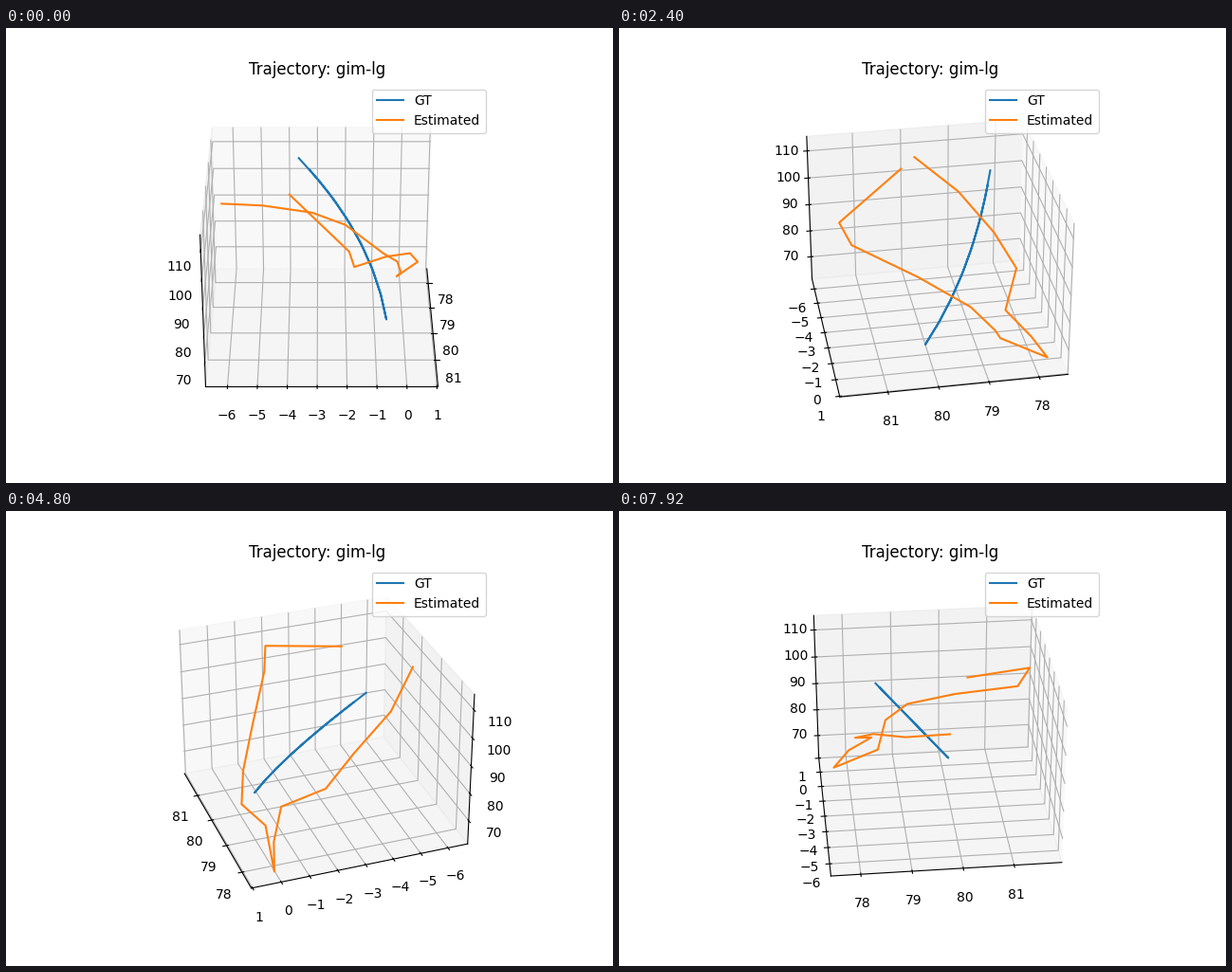
A matplotlib script that plays this animation: 640x480 px, repeating every 8 s.

```python
import numpy as np
import matplotlib.pyplot as plt
from matplotlib.animation import FuncAnimation

TICK = 40          # ms per drawn frame
HOLD = 3           # drawn frames per rotation step
STEP = 4           # degrees per rotation step
FRAMES = 200
Z_MID = 88.3


def arc(h):
    """Smooth curve through space, h above or below the middle height."""
    x = 79.243 - 0.03685 * h + 0.000213 * h**2
    y = -1.507 - 0.06416 * h - 0.000998 * h**2
    return x, y, Z_MID + h


# True path: down the arc in six steps, back up in seven
heights = np.concatenate([np.linspace(20.7, -20.8, 7),
                          np.linspace(-20.8, 24.2, 8)[1:]])
gt = arc(heights)

# Estimated path: even steps in height down and up again between these turns
turns = np.array([
    (79.76, -6.24), (78.98, -4.90), (78.43, -3.19), (78.11, -2.00),
    (78.49, -0.65), (78.03, -0.11), (77.71, 0.07), (78.64, -0.17),
    (78.84, 0.55), (79.29, 0.23), (80.23, -0.66), (81.43, -1.78),
    (81.65, -1.96), (80.25, -3.92),
])
level = 62.4 + 7.42 * np.abs(np.arange(len(turns)) - 6)
estimated = (*turns.T, level)

fig = plt.figure(figsize=(6.4, 4.8), dpi=100)
ax = fig.add_subplot(projection="3d")
ax.plot(*gt, label="GT")
ax.plot(*estimated, label="Estimated")
ax.set_xticks(range(78, 82))
ax.set_yticks(range(-6, 2))
ax.set_zticks(range(70, 111, 10))
ax.set_xlim(77.42, 81.94)
ax.set_ylim(-6.73, 1.04)
ax.set_zlim(Z_MID - 27, Z_MID + 27)
ax.set_title("Trajectory: gim-lg")
ax.legend(loc="upper right")


def rotate(i):
    ax.view_init(elev=30, azim=STEP * (i // HOLD))
    return ()


anim = FuncAnimation(fig, rotate, frames=FRAMES, interval=TICK,
                     repeat=True, repeat_delay=0)
plt.show()
```
